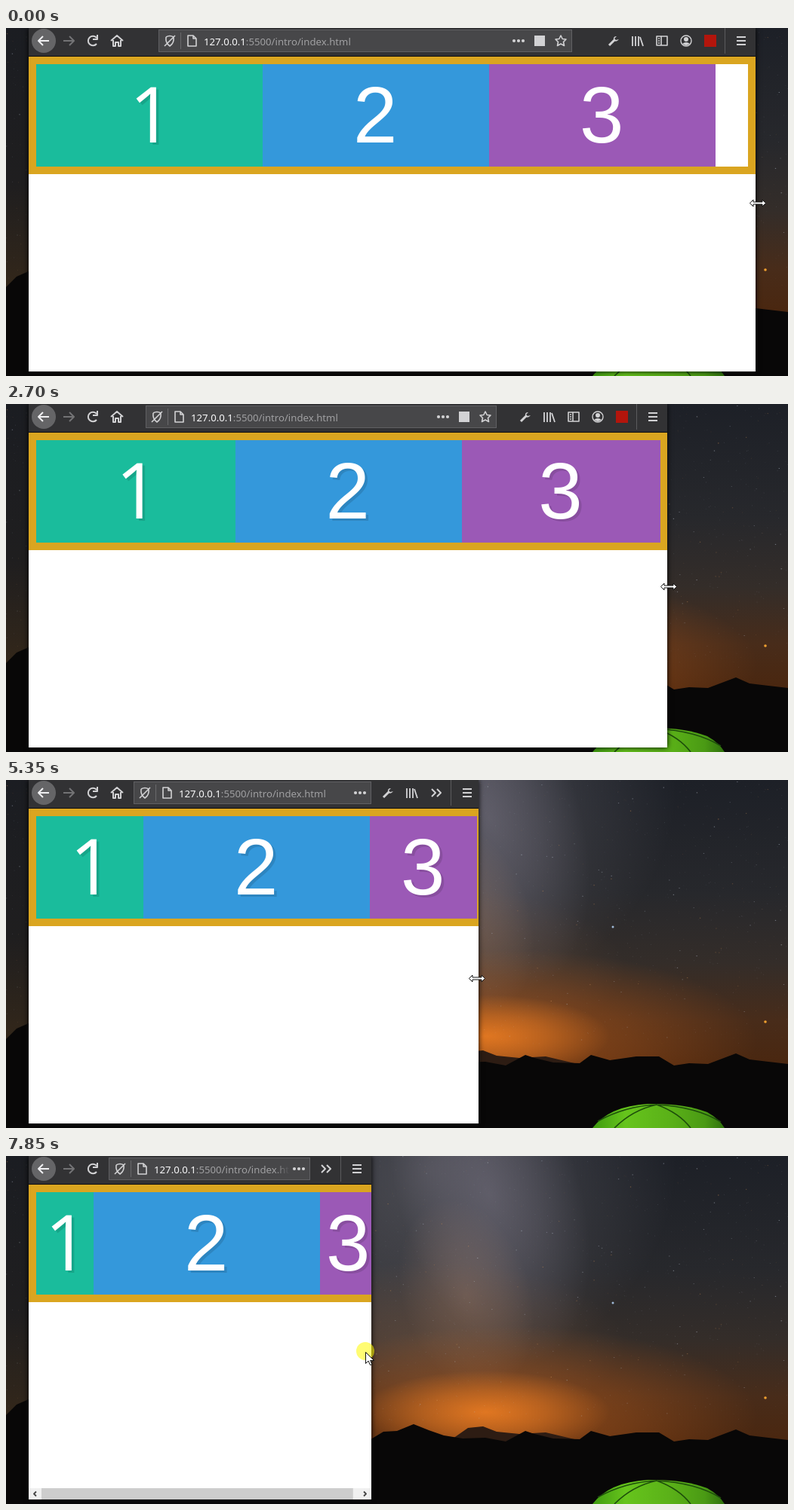
Recreate the animation shown at these times as an HTML page with a canvas. Size 1036x462 px, loop 8 s.

```html
<!DOCTYPE html>
<html lang="en">
<head>
<meta charset="utf-8">
<title>Shrinking flex items</title>
<style>
html, body { margin: 0; width: 100%; height: 100%; overflow: hidden; background: #000; }
canvas { display: block; }
</style>
</head>
<body>
<canvas id="stage" width="1036" height="462"></canvas>
<script>
const WIDTH = 1036, HEIGHT = 462, LOOP = 8000, STEP = 50;
const LEFT = 30, BOTTOM = 456, FIELD = '#474749', ICON = '#d2d2d4';
const ctx = document.getElementById('stage').getContext('2d');

// time, window edge, layout lag, pointer offset, pointer y, toolbar spring
const KEYS = [
  [0, 993, 0, 3, 232, 39], [800, 993, 0, 3, 232, 39],
  [1650, 917, 0, 3, 237, 28], [1800, 906, 0, 1, 238, 26],
  [2000, 901, 0, 3, 239, 26], [2500, 901, 0, 3, 239, 26],
  [3200, 812, 2, 0, 251, 13], [3350, 808, 0, 3, 252, 13],
  [3600, 787, 0, 3, 255, 16], [4050, 787, 0, 3, 255, 16],
  [4200, 761, 5, -4, 256, 15], [4850, 663, 0, 3, 262, 8],
  [5200, 663, 0, 3, 262, 8], [5350, 626, 8, -2, 263, 6],
  [5600, 592, 4, 0, 263, 9], [6050, 559, 0, 3, 263, 13],
  [6400, 559, 0, 3, 263, 13], [7250, 484, 0, 0, 260, 5],
  [LOOP, 484, 0, 0, 260, 5]
];

function pose(t) {
  const i = KEYS.findIndex(k => k[0] > t);
  const a = KEYS[i - 1], b = KEYS[i], p = (t - a[0]) / (b[0] - a[0]);
  const [, edge, lag, offset, y, spring] = a.map((v, j) => Math.round(v + (b[j] - v) * p));
  return { edge, layout: edge + lag, pointerX: edge + offset, pointerY: y, spring };
}

function rect(c, color, x, y, w, h) {
  c.fillStyle = color;
  c.fillRect(x, y, w, h);
}

function disc(c, color, x, y, r) {
  c.fillStyle = color;
  c.beginPath();
  c.arc(x, y, r, 0, 7);
  c.fill();
}

function shape(c, path, fill, stroke, x = 0, y = 0, width = 1) {
  const p = new Path2D(path);
  c.save();
  c.translate(x, y);
  c.lineWidth = width;
  c.lineJoin = 'round';
  if (fill) { c.fillStyle = fill; c.fill(p); }
  if (stroke) { c.strokeStyle = stroke; c.stroke(p); }
  c.restore();
}

function makeSky() {
  const canvas = document.createElement('canvas');
  canvas.width = WIDTH;
  canvas.height = HEIGHT;
  const c = canvas.getContext('2d');

  const fade = (g, stops) => {
    stops.forEach(([at, color]) => g.addColorStop(at, color));
    return g;
  };
  const glow = (x, y, rx, ry, angle, rgb, alpha) => {
    c.save();
    c.translate(x, y);
    c.rotate(angle);
    c.scale(rx, ry);
    c.fillStyle = fade(c.createRadialGradient(0, 0, 0, 0, 0, 1), [
      [0, `rgba(${rgb},${alpha})`], [.5, `rgba(${rgb},${alpha * .55})`], [1, `rgba(${rgb},0)`]
    ]);
    c.fillRect(-1, -1, 2, 2);
    c.restore();
  };

  rect(c, fade(c.createLinearGradient(0, 0, 0, 375), [
    [0, '#1d2027'], [.4, '#27282c'], [.65, '#342d29'], [.85, '#482c1a'], [1, '#4a2710']
  ]), 0, 0, WIDTH, HEIGHT);
  glow(560, 20, 330, 290, -.2, '118,116,124', .5);
  glow(640, 50, 120, 230, -.3, '140,134,152', .4);
  glow(610, 185, 85, 130, -.3, '165,130,112', .4);
  glow(560, 250, 260, 110, 0, '130,92,66', .4);
  glow(665, 345, 330, 120, 0, '200,100,30', .55);
  glow(635, 340, 165, 55, 0, '245,130,35', .8);
  rect(c, fade(c.createLinearGradient(0, 0, 0, 345), [
    [0, '#1b1d22'], [.6, '#1f1e1f'], [1, '#33271a']
  ]), 0, 0, LEFT, 345);

  let seed = 11;
  const random = () => (seed = seed * 16807 % 2147483647) / 2147483647;
  for (let i = 0; i < 1500; i++) {
    const faint = i > 170;
    const x = random() * WIDTH, y = random() * 350;
    const color = random() < .25 ? '215,150,90' : '190,200,215';
    const alpha = faint ? .05 + random() * .1 : .2 + random() * .35;
    rect(c, `rgba(${color},${alpha})`, x, y, faint ? 1 : 1.3, 1);
  }
  disc(c, '#f0a030', 1006, 321, 1.8);
  disc(c, '#9fbad8', 804, 195, 1.5);

  shape(c, 'M585 380L612 361L632 359L650 366L680 369L715 367L770 380Z', '#2d1c13');
  shape(c, `M0 344L14 330L30 323V400H440L485 375L500 366L518 365L540 356L560 364L580 371
    L605 375L635 374L662 379L688 365L700 369L725 375L760 376L775 365L800 372L835 367
    L865 367L885 379L905 376L930 377L967 363L985 371L1010 374L1036 377V462H0Z`, '#080707');

  const tent = fade(c.createLinearGradient(777, 0, 952, 0), [
    [0, '#3f9a10'], [.25, '#66c41c'], [.6, '#5ab018'], [.85, '#4a9a14'], [1, '#2f700d']
  ]);
  shape(c, 'M777 462Q799 433 850 430Q898 429 929 441Q945 450 952 462Z', tent);
  shape(c, 'M784 453Q820 433 862 431Q892 442 907 462M862 431Q830 438 806 462M862 431Q915 434 947 454',
    null, '#1d4d0b', 0, 0, 1.6);
  return canvas;
}

const sky = makeSky();

const icons = {
  back: 'M7 0H-7M-1-6L-7 0L-1 6',
  forward: 'M-7 0H7M1-6L7 0L1 6',
  reload: 'M5 4A6.3 6.3 0 1 1 5-4M6-8V-2H0',
  home: 'M-8 0L0-7L8 0M-5-1V7H-2V2H2V7H5V-1',
  shield: 'M-5-5Q0-8 5-5Q6 3 0 7Q-6 3-5-5M7-7L-7 7',
  page: 'M-5-7H2L6-3V7H-5ZM2-7V-3H6',
  star: 'M0-7L2.2-2.5L7-2L3.5 1.5L4.5 6.5L0 4L-4.5 6.5L-3.5 1.5L-7-2L-2.2-2.5Z',
  library: 'M-7-6V7M-3-6V7M1-6V7M3-5L7 7',
  sidebar: 'M-7-6H7V6H-7ZM-1-6V6M-5-3H-3M-5 0H-3M-5 3H-3',
  chevrons: 'M-6-5L-1 0L-6 5M1-5L6 0L1 5',
  menu: 'M-6-5H6M-6 0H6M-6 5H6'
};

function icon(name, x, color = ICON, width = 1.8) {
  shape(ctx, icons[name], null, color, x, 17, width);
}

const tools = [
  x => {
    shape(ctx, 'M-6 6L1-1', null, ICON, x, 17, 3);
    shape(ctx, 'M4-6Q-1-6 0-1Q3 3 7-2L3-1L1-3Z', ICON, null, x, 17);
  },
  x => icon('library', x),
  x => icon('sidebar', x, ICON, 1.6),
  x => {
    shape(ctx, 'M7 0A7 7 0 1 1-7 0A7 7 0 1 1 7 0', null, ICON, x, 17, 1.4);
    disc(ctx, ICON, x, 15, 3);
    shape(ctx, 'M-5 4Q0 0 5 4Q0 8-5 4', ICON, null, x, 17);
  },
  x => rect(ctx, '#b3150c', x - 8, 9, 16, 16)
];

function drawToolbar(right, spring) {
  rect(ctx, '#323234', LEFT, 0, WIDTH, 37);
  rect(ctx, '#0c0c0d', LEFT, 37, WIDTH, 1);

  // Tools move into the overflow menu while the address field is too narrow.
  let shown = tools.length, room = right - 367, start = 163;
  if (room < 300) { shown = 3; room += 32; }
  while (room < 300 && shown) { shown--; room += 32; }
  if (room < 300) { start = 131; room += 32; }

  disc(ctx, '#656567', 50, 17, 16);
  icon('back', 50, '#f0f0f2', 2);
  icon('forward', 83, '#737375', 2);
  icon('reload', 115, ICON, 2);
  if (start === 163) icon('home', 147, ICON, 2);

  const x = start + spring, end = start + room - spring;
  rect(ctx, '#606063', x, 2, end - x, 30);
  rect(ctx, FIELD, x + 1, 3, end - x - 2, 28);
  icon('shield', x + 15, ICON, 1.6);
  rect(ctx, '#69696b', x + 29, 6, 1, 22);
  icon('page', x + 44, ICON, 1.6);

  const wide = end - x > 340, dots = end - (wide ? 71 : 15);
  ctx.save();
  ctx.beginPath();
  ctx.rect(x, 0, dots - 12 - x, 37);
  ctx.clip();
  ctx.font = '13.2px "Noto Sans", sans-serif';
  ctx.textAlign = 'left';
  ctx.fillStyle = '#f9f9fa';
  ctx.fillText('127.0.0.1', x + 60, 23);
  const hostWidth = ctx.measureText('127.0.0.1').width;
  ctx.fillStyle = '#a0a0a2';
  ctx.fillText(':5500/intro/index.html', x + 60 + hostWidth, 23);
  const veil = ctx.createLinearGradient(dots - 31, 0, dots - 12, 0);
  veil.addColorStop(0, 'rgba(71,71,73,0)');
  veil.addColorStop(1, FIELD);
  rect(ctx, veil, dots - 31, 4, 20, 26);
  ctx.restore();

  for (const d of [-6, 0, 6]) disc(ctx, ICON, dots + d, 17, 2.1);
  if (wide) {
    rect(ctx, ICON, end - 50, 10, 14, 14);
    icon('star', end - 15, ICON, 1.6);
  }

  const first = start + room + 16;
  tools.slice(0, shown).forEach((draw, i) => draw(first + i * 32));
  if (shown < tools.length) icon('chevrons', first + shown * 32, ICON, 2);
  rect(ctx, '#5b5b5d', right - 41, 0, 1, 34);
  icon('menu', right - 19, ICON, 2);
}

function drawDigit(digit, center, shadow) {
  // The numeral one comes from a face that draws it without a foot.
  const plainOne = digit === 1;
  const x = center + (plainOne ? 2.5 : -.7), y = 151.5;
  ctx.font = plainOne ? '102px "Open Sans", sans-serif' : '105px "Liberation Sans", Arial, sans-serif';
  ctx.textAlign = 'center';
  if (shadow) {
    ctx.fillStyle = 'rgba(0,0,0,.12)';
    ctx.fillText(digit, x + 3.5, y + 3.5);
  }
  ctx.fillStyle = '#fff';
  ctx.fillText(digit, x, y);
}

function drawPage(edge, layout, t) {
  rect(ctx, '#fff', LEFT, 38, edge - LEFT, BOTTOM - 38);
  rect(ctx, '#daa520', LEFT, 38, layout - LEFT, 156);
  rect(ctx, '#fff', 40, 48, layout - 50, 136);
  const side = Math.max(76, Math.min(300, (layout - 350) / 2));
  let x = 40;
  [[side, '#1abc9c'], [300, '#3498db'], [side, '#9b59b6']].forEach(([width, color], i) => {
    const from = Math.round(x), to = Math.round(x + width);
    rect(ctx, color, from, 48, to - from, 136);
    drawDigit(i + 1, x + width / 2, i === 0 || t >= 700);
    x += width;
  });

  const view = edge - LEFT, content = 462;
  if (view < content) {
    rect(ctx, '#f0f0f0', LEFT, 441, view, 15);
    rect(ctx, '#cdcdcd', 47, 441, (view - 34) * view / content, 15);
    shape(ctx, 'M2-3L-1 0L2 3', null, '#444', 38, 448.5, 1.8);
    shape(ctx, 'M-2-3L1 0L-2 3', null, '#444', edge - 8, 448.5, 1.8);
  }
}

function drawPointer(t, x, y) {
  if (t < 7400) {
    shape(ctx, 'M-10.5 0L-6-4.5V-1.5H6V-4.5L10.5 0L6 4.5V1.5H-6V4.5Z', '#fff', '#111', x, y + .5);
    return;
  }
  const tip = 484 - 8 * Math.max(0, Math.min(1, (t - 7700) / 150));
  if (t >= 7600) disc(ctx, 'rgba(255,250,0,.55)', tip, 259, 12);
  shape(ctx, 'M.5 .5V15.5L4 12L6.5 17.5L9 16.5L6.5 11.5H11.5Z', '#fff', '#111', tip, 260);
}

function draw(t) {
  const { edge, layout, pointerX, pointerY, spring } = pose(t);
  ctx.drawImage(sky, 0, 0);
  ctx.save();
  ctx.shadowColor = '#000';
  ctx.shadowBlur = 7;
  rect(ctx, '#fff', LEFT, 0, edge - LEFT, BOTTOM);
  ctx.restore();

  ctx.save();
  ctx.beginPath();
  ctx.rect(LEFT, 0, edge - LEFT, BOTTOM);
  ctx.clip();
  drawPage(edge, layout, t);
  drawToolbar(Math.max(edge, layout - 4), spring);
  ctx.restore();
  drawPointer(t, pointerX, pointerY);
}

function frame() {
  const t = performance.now() % LOOP;
  draw(Math.floor(t / STEP) * STEP);
  requestAnimationFrame(frame);
}
frame();
</script>
</body>
</html>
```
